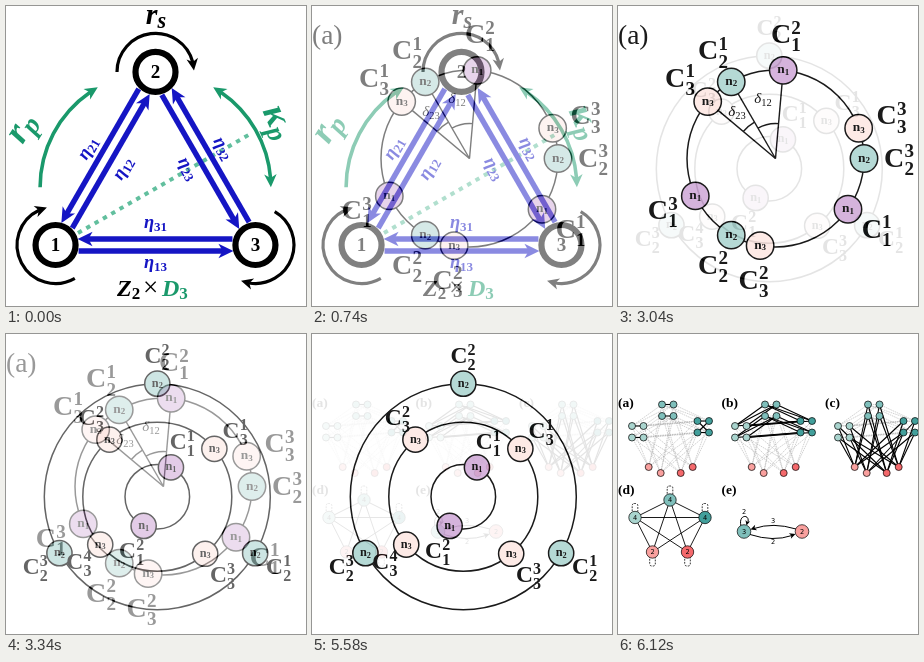
Recreate the animation shown at these times as an HTML page. Size 300 by 300 pixels, loop 8000 ms.

```html
<!DOCTYPE html>
<html lang="en">
<head>
<meta charset="utf-8">
<title>Network symmetries</title>
<style>
html, body { margin: 0; width: 100%; height: 100%; overflow: hidden; background: #fff; }
svg { display: block; width: 300px; height: 300px; }
text { font-family: "Liberation Serif", "Noto Serif", serif; font-weight: bold; }
.sans { font-family: "DejaVu Sans", sans-serif; font-weight: normal; }
.plain { font-weight: normal; }
.mid { text-anchor: middle; }
.ital { font-style: italic; }
</style>
</head>
<body>
<svg id="stage" viewBox="0 0 300 300" xmlns="http://www.w3.org/2000/svg"></svg>
<script>
const BLUE = '#1515c4', GREEN = '#1a996b', BLACK = '#000';
const FILL = { 1: '#d1abd8', 2: '#add5d1', 3: '#fde8e4' };
const polar = ([cx, cy], r, deg) => {
  const a = deg * Math.PI / 180;
  return [cx + r * Math.cos(a), cy + r * Math.sin(a)];
};

const line = (a, b, w = 1, c = BLACK, extra = '') =>
  `<line x1="${a[0]}" y1="${a[1]}" x2="${b[0]}" y2="${b[1]}" stroke="${c}" stroke-width="${w}" ${extra}/>`;
const curve = (d, w = 1, c = BLACK, extra = '') =>
  `<path d="${d}" fill="none" stroke="${c}" stroke-width="${w}" ${extra}/>`;
const disc = ([x, y], r, fill = 'none', w = 1.5) =>
  `<circle cx="${x}" cy="${y}" r="${r}" fill="${fill}" stroke="${BLACK}" stroke-width="${w}"/>`;
const text = ([x, y], size, s, cls = '', fill = BLACK) =>
  `<text x="${x}" y="${y}" font-size="${size}" class="${cls}" fill="${fill}">${s}</text>`;
const low = (s, size, drop, style = 'normal') =>
  `<tspan font-size="${size}" font-style="${style}" dy="${drop}">${s}</tspan>`;
const turned = ([x, y], deg, body) => `<g transform="translate(${x} ${y}) rotate(${deg})">${body}</g>`;

// Arrow head with its tip at p, pointing along deg
const head = (p, deg, len, c = BLACK) => turned(p, deg,
  `<path d="M0 0L${-len} ${-len * .48}L${-len * .72} 0L${-len} ${len * .48}Z" fill="${c}"/>`);

// Clockwise arc with optional heads at its ends
function arc(c, r, from, to, w = 1.4, color = BLACK, headTo = 0, headFrom = 0) {
  const bend = len => len * .7 / r * 180 / Math.PI;
  const a = polar(c, r, from + bend(headFrom)), b = polar(c, r, to - bend(headTo));
  let s = curve(`M${a}A${r} ${r} 0 ${to - from > 185 ? 1 : 0} 1 ${b}`, w, color);
  if (headTo) s += head(polar(c, r, to), to + 90 - bend(headTo) / 2, headTo, color);
  if (headFrom) s += head(polar(c, r, from), from - 90 + bend(headFrom) / 2, headFrom, color);
  return s;
}

// Straight arrow between two rings, shifted to its right-hand side
function link(a, b) {
  const dx = b[0] - a[0], dy = b[1] - a[1], d = Math.hypot(dx, dy);
  const at = s => [a[0] + (dx * s - dy * 6) / d, a[1] + (dy * s + dx * 6) / d];
  return line(at(23), at(d - 32), 5.4, BLUE) +
    head(at(d - 22), Math.atan2(dy, dx) * 180 / Math.PI, 15, BLUE);
}

function triangle() {
  const c = [149.5, 181.3], R = 115.4, sweep = { 1: 107, 2: 88, 3: 82 };
  const angle = n => 30 + 120 * n, node = n => polar(c, R, angle(n));
  let s = line([72, 227], [246, 127], 4, '#62bf9e', 'stroke-dasharray="4.4 5.2"');
  for (let n = 1; n <= 3; n++) {
    const next = n % 3 + 1, side = angle(n) + 60, tilt = side % 180 - 90;
    const eta = (r, ij) => turned(polar(c, r, side), tilt,
      text([0, 4], 18.5, 'η' + low(ij, 13, 3), 'mid ital', BLUE));
    s += link(node(n), node(next)) + link(node(next), node(n));
    s += eta(36.5, `${n}${next}`) + eta(77, `${next}${n}`);
    s += arc(node(n), 38.5, angle(n) - 90, angle(n) + sweep[n], 3.2, BLACK, 12);
  }
  for (let n = 1; n <= 3; n++) {
    const [x, y] = node(n);
    s += disc([x, y], 20, '#fff', 6.2) + text([x, y + 6], 19, n, 'mid');
  }
  s += arc(c, R, 180, 240, 3.6, GREEN, 13) + arc(c, R, 300, 360, 3.6, GREEN, 13, 13);

  const pair = (p, deg, size, a, b, color) => turned(p, deg,
    text([0, 0], size, a + low(b, size * .74, size * .14, 'italic'), 'mid ital', color));
  s += pair([24, 127], -58, 37, 'r', 'p', GREEN) + pair([263, 120], 66, 37, 'κ', 'p', GREEN) +
    pair([150, 18], 0, 30, 'r', 's', BLACK);
  const group = (x, a, b, color) => text([x, 290], 24, a + low(b, 17, 3), 'ital', color);
  return s + group(111, 'Z', 2, BLACK) + text([137, 290], 27, '×', 'plain') + group(156, 'D', 3, GREEN);
}

// C with an upper and a lower index, centred on the given point
function orbit([x, y], size, up, down) {
  const left = x - size * .55, base = y + size * .29, index = left + size * .73;
  return text([left, base], size, 'C') + text([index, base - size * .34], size * .68, up) +
    text([index, base + size * .3], size * .68, down);
}

// Evenly spaced beads of kind k on a circle, one label per bead
function beads(c, r, k, first, ups, size, label, gap) {
  return [...ups].map((up, i) => {
    const deg = first + 360 / ups.length * i, p = polar(c, r, deg);
    return disc(p, size, FILL[k]) +
      text([p[0], p[1] + 3], size * .98, 'n' + low(k, size * .66, 1.6), 'mid') +
      orbit(polar(c, r + gap, deg), label, up, k);
  }).join('');
}

function ring() {
  const c = [157.5, 152.5], r = 88.5, first = { 1: -85, 2: -120, 3: -140 };
  let s = disc(c, r);
  for (const k in first) s += line(c, polar(c, r, first[k]), 1.4);
  s += arc(c, 35, first[2], first[1]) + arc(c, 42, first[3], first[2]);
  const delta = (p, ij) => text(p, 15, 'δ' + low(ij, 10.5, 2.5), 'mid ital plain');
  s += delta([145, 97], '12') + delta([119, 110], '23');
  for (const k in first) s += beads(c, r, k, first[k], k == 1 ? '213' : '132', 13.7, 28, 35.5);
  return s + text([0, 38], 27.5, '(a)', 'plain');
}

function shells() {
  const c = [151.3, 162.7];
  const shell = (r, k, first, ups) => disc(c, r) + beads(c, r, k, first, ups, 12.6, 23.5, 27.5);
  return shell(113, 2, -90, '213') + shell(74.5, 3, -40, '1342') + shell(32.3, 1, -65, '12');
}

const TEAL = ['#a9d4ce', '#7fbfbb', '#429f9b'], RED = ['#f9a09e', '#f4696c'];

// Three groups of four joined to a row of four; mode picks the heavy edges
function clusters(ox, mode) {
  const teal = [[14, 92], [44, 70.5], [79.5, 87]].map(([x, y]) =>
    [0, 1, 2, 3].map(i => [x + 11.5 * (i % 2), y + 11.5 * (i >> 1)]));
  const red = [-22, -10, 10, 22].map(d => [52.7 + d, 144 - Math.abs(d) / 2]);
  let thin = '', heavy = '';
  const edge = (a, b, strong) => {
    if (strong) heavy += line(a, b, 1.1);
    else thin += line(a, b, .5, '#a4a4a4', 'stroke-dasharray="1.6 .8"');
  };
  teal.forEach((q, g) => {
    const next = teal[(g + 1) % 3];
    for (let i = 0; i < 4; i++) {
      for (let j = i + 1; j < 4; j++) if (g === 2 ? i + j !== 2 && i + j !== 4 : j === i + 1 && i !== 1) edge(q[i], q[j], mode === 0);
      edge(q[i], next[i], mode === 1);
      if (i % 2 === 0) edge(q[i], next[i + 1], mode === 1);
      for (let j = 0; j < 4; j++) if ((i + j) % 2 === 0) edge(q[i], red[j], mode === 2);
    }
  });
  const dots = (list, fill) => list.map((p, i) => disc(p, 3.5, fill(i), .7)).join('');
  const nodes = teal.map((q, g) => dots(q, () => TEAL[g])).join('') + dots(red, i => RED[i >> 1]);
  return turned([ox, 0], 0, thin + heavy + nodes);
}

const num = ([x, y], n) => text([x, y + 2.4], 6.6, n, 'sans mid');

function star() {
  const top = [-1, 0, 1].map(i => [52 + 35 * i, 166 + 17.5 * Math.abs(i)]);
  const all = [...top, [34.5, 218], [69.5, 218]];
  let s = '';
  top.forEach((a, i) => all.slice(i + 1).forEach(b => s += line(a, b, .9)));
  all.forEach((p, i) => {
    const up = i < 3, y = up ? p[1] - 14 : p[1] + 4;
    s += `<rect x="${p[0] - 2.8}" y="${y}" width="5.6" height="10" rx="2" fill="none" stroke="#000" stroke-width=".8" stroke-dasharray="1.8 1.2"/>`;
    s += disc(p, 6.2, [...TEAL, ...RED][i], .7) + num(p, up ? 4 : 2);
  });
  return s;
}

function twoNodes() {
  const a = [126, 197.5], b = [184, 197.5];
  return curve('M178 195Q155 188 136 194.5') + head([132.5, 195.5], 160, 6) +
    curve('M132 200.5Q155 208 174 201.5') + head([177.5, 200], -20, 6) +
    curve('M123 192C120 180 132 180 130 188') + head([128.5, 191.5], 105, 5) +
    disc(a, 6.8, TEAL[1], .7) + disc(b, 6.8, RED[0], .7) +
    num(a, 3) + num(b, 2) + num([155, 187], 3) + num([155, 207.5], 2) + num([126, 178], 2);
}

function quotients() {
  let s = star() + twoNodes();
  for (let i = 0; i < 3; i++) s += clusters(103 * i, i);
  [...'abcde'].forEach((ch, i) =>
    s += text([103.5 * (i % 3), i < 3 ? 73 : 160], 13.5, `(${ch})`));
  return s;
}

const stage = document.getElementById('stage');
stage.innerHTML = [triangle, ring, shells, quotients]
  .map(draw => `<g><rect width="300" height="300" fill="#fff"/>${draw()}</g>`).join('');
const scenes = [...stage.children];

// Each scene fades in over the one below, in ten steps of 60 ms
const LOOP = 8000, FIRST = 500, HOLD = 2540, STEP = 60;
const start = performance.now();
function render(now) {
  const t = Math.max(0, now - start) % LOOP;
  scenes.slice(1).forEach((scene, i) => {
    const n = Math.floor((t - FIRST - HOLD * i) / STEP) + 1;
    scene.setAttribute('opacity', Math.min(10, Math.max(0, n)) / 10);
  });
  requestAnimationFrame(render);
}
render(start);
</script>
</body>
</html>
```
